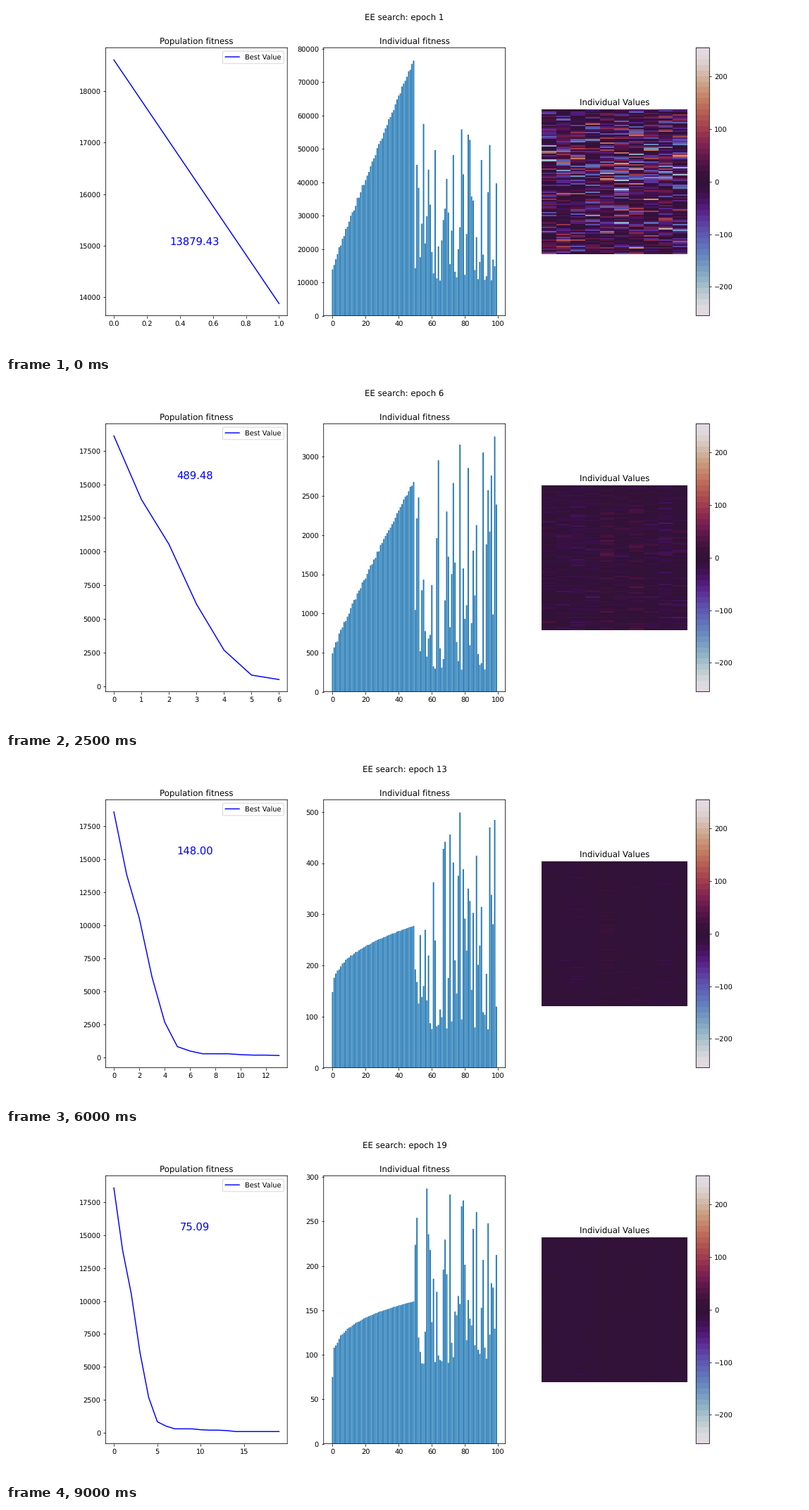
A matplotlib script that plays this animation: 1131 px wide and 495 px high, repeating every 9.5 s.

```python
import numpy as np
import matplotlib.pyplot as plt
from matplotlib.animation import FuncAnimation

EPOCHS = 19
KEEP, POP, GENES = 50, 100, 10
LIMIT = 255

# best value after each epoch, starting with the initial population
BEST = [18600, 13879.43, 10550, 6100, 2678.22, 820, 489.48, 281.92, 281.92,
        279.6, 214, 179.65, 179.65, 148, 75.09] + [75.09] * 6

# key epochs; the values between them are interpolated
KEYS = [1, 4, 6, 8, 11, 15, 19]
WORST = [76500, 9920, 2680, 898, 361, 213, 160]     # last survivor
BEND = [0.93, 0.68, 0.9, 0.7, 0.58, 0.24, 0.27]     # survivor curve exponent
PEAK = [57500, 10320, 3260, 1095, 540, 461, 287]    # tallest newcomer
PEAK_AT = [55, 60, 98, 76, 66, 89, 57]
SKEW = 1.7

# preferred sign of each gene as the search narrows
LEAN = np.array([0, -.3, -.6, -.1, .7, .3, .6, 0, -.6, .2])


def at(epoch, values):
    return np.interp(epoch, KEYS, values)


def log_at(epoch, values):
    return np.exp(at(epoch, np.log(values)))


def survivors(epoch, rng):
    """Sorted fitness rising from the best value to the worst survivor."""
    rank = np.arange(KEEP) + rng.uniform(-0.5, 0.5, KEEP)
    rank[0], rank[-1] = 0, KEEP - 1
    best, worst = BEST[epoch], log_at(epoch, WORST)
    share = np.sort(rank) / (KEEP - 1)
    return best + (worst - best) * share ** at(epoch, BEND)


def newcomers(epoch, rng):
    """Shuffled, skewed fitness; its lowest value is the next best."""
    low = BEST[epoch + 1]
    if low == BEST[epoch]:
        low *= 1.2
    share = rng.permutation(np.linspace(0, 1, KEEP)) ** SKEW
    spot = int(at(epoch, PEAK_AT)) - KEEP
    share = np.roll(share, spot - np.argmax(share))
    return low + (log_at(epoch, PEAK) - low) * share


def unit(rows):
    return rows / np.linalg.norm(rows, axis=1, keepdims=True)


def evolve():
    """Fitness and gene values of the population for every epoch."""
    rng = np.random.default_rng(7)
    noise = rng.standard_normal((POP, GENES))
    genes = unit(np.sign(noise) * np.abs(noise) ** 1.2)
    history = []
    for epoch in range(1, EPOCHS + 1):
        fit = np.append(survivors(epoch, rng), newcomers(epoch, rng))
        history.append((fit, genes * np.sqrt(fit)[:, None]))
        drift = 0.1 * rng.standard_normal((POP, GENES)) + 0.1 * LEAN
        genes = unit(genes + drift)
    return history


history = evolve()

plt.rcParams.update({"path.snap": False, "text.hinting": "none"})
fig, (ax_line, ax_bar, ax_map) = plt.subplots(
    1, 3, figsize=(16, 7.003), dpi=1131 / 16)
title = fig.suptitle("")
heat = ax_map.imshow(history[0][1], cmap=plt.get_cmap("twilight", 48),
                     vmin=-LIMIT, vmax=LIMIT, aspect=GENES / POP,
                     interpolation="nearest")
ax_map.set_title("Individual Values")
ax_map.axis("off")
fig.colorbar(heat, ax=ax_map)


def draw(frame):
    epoch = frame + 1
    fit, values = history[frame]
    title.set_text(f"EE search: epoch {epoch}")

    ax_line.clear()
    ax_line.set_title("Population fitness")
    ax_line.plot(range(epoch + 1), BEST[:epoch + 1], "b", label="Best Value")
    ax_line.annotate(f"{BEST[epoch]:.2f}", (0.49 * epoch, 0.8 * BEST[0]),
                     xytext=(0, 10), textcoords="offset points",
                     ha="center", size=15, color="b")
    ax_line.legend(loc="upper right")

    ax_bar.clear()
    ax_bar.set_title("Individual fitness")
    ax_bar.bar(range(POP), fit)

    heat.set_data(values)
    return []


anim = FuncAnimation(fig, draw, frames=EPOCHS, interval=500, repeat=True,
                     repeat_delay=0, init_func=lambda: draw(0), blit=False)
plt.show()
```
